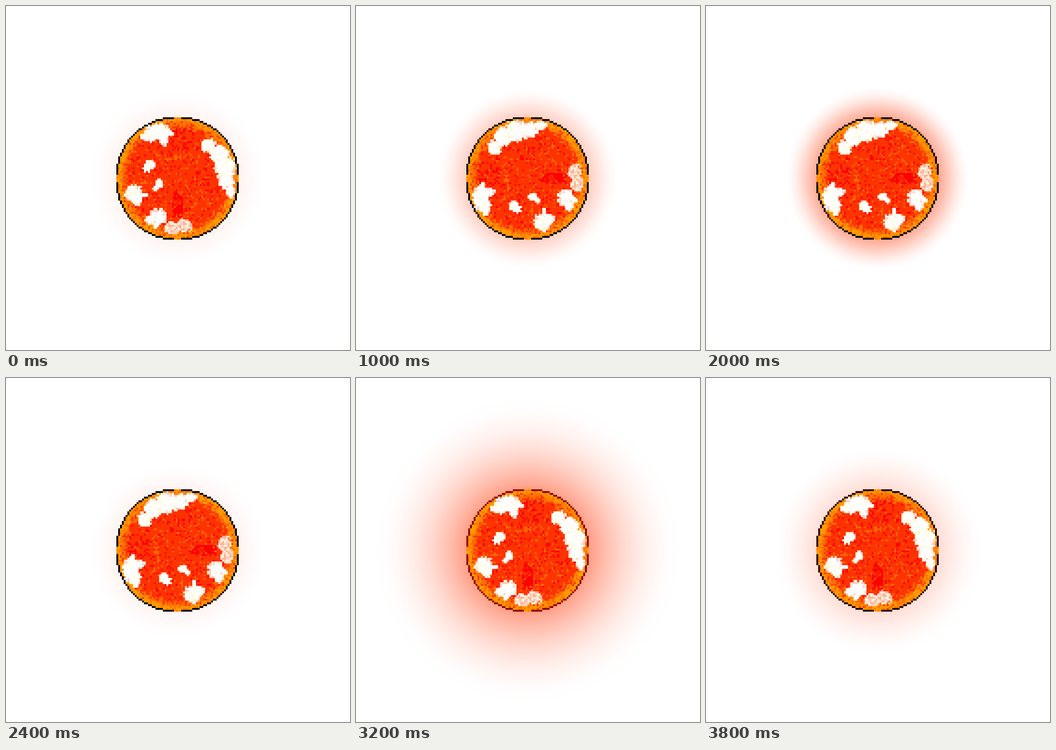
An HTML page with a canvas that plays this animation: 748 px wide and 748 px high, repeating every 4 s.

```html
<!DOCTYPE html>
<html lang="en">
<head>
<meta charset="utf-8">
<title>Glowing orb</title>
<style>
html, body { margin: 0; width: 100%; height: 100%; overflow: hidden; background: #fff; }
canvas { display: block; }
</style>
</head>
<body>
<canvas id="stage" width="748" height="748"></canvas>
<script>
const ctx = document.getElementById("stage").getContext("2d");
const N = 66, SIZE = 266, CX = 373, CY = 375, RADIUS = 132;
const HALF = SIZE / 2;

let seed = 41;
function random() {
  seed = (seed + 0x6D2B79F5) | 0;
  let t = Math.imul(seed ^ (seed >>> 15), 1 | seed);
  t = (t + Math.imul(t ^ (t >>> 7), 61 | t)) ^ t;
  return ((t ^ (t >>> 14)) >>> 0) / 4294967296;
}

// Bright patches: centre x, y, radius x, y in stage pixels
const patches = [
  [331, 273, 29, 17], [312, 284, 19, 11], [343, 291, 11, 12], [354, 278, 12, 6],
  [441, 303, 15, 15], [463, 322, 20, 19], [477, 350, 23, 23], [478, 378, 17, 19], [488, 402, 10, 15],
  [313, 346, 12, 11], [307, 354, 8, 7],
  [333, 386, 8, 9], [325, 396, 7, 6],
  [278, 407, 19, 18], [286, 421, 10, 13], [301, 411, 8, 5],
  [330, 458, 20, 17], [314, 465, 11, 9], [325, 474, 8, 7]
];
const veil = [[364, 483, 18, 14], [388, 476, 18, 15]];

const nearest = (list, x, y) =>
  Math.min(...list.map(([a, b, rx, ry]) => Math.hypot((x - a) / rx, (y - b) / ry)));

const within = (x, y, x0, y0, x1, y1) => x > x0 && x < x1 && y > y0 && y < y1;

function inside(i, j) {
  const x = i - 32.5, y = j - 32.5;
  return x * x + y * y < 1126;
}

const onEdge = (i, j) => inside(i, j) &&
  !(inside(i - 1, j) && inside(i + 1, j) && inside(i, j - 1) && inside(i, j + 1));

function surface(x, y, r) {
  const a = random(), b = random();
  const patch = nearest(patches, x, y) + (a - 0.5) * 0.3;
  if (patch < 0.8) return b < 0.85 ? "#fff" : "#fffbd8";
  if (patch < 1.05) return b < 0.4 ? "#fff" : b < 0.7 ? "#fff0cc" : "#ffccc4";
  if (nearest(veil, x, y) + (a - 0.5) * 0.3 < 1)
    return b < 0.35 ? "#fff4e0" : b < 0.7 ? "#ffd0c0" : "#ffb090";

  const rim = r + (a - 0.5) * 3.5;
  if (rim > 30.3) return b < 0.65 ? "#ff9900" : "#ff7a00";
  if (rim > 28) return b < 0.75 ? "#ff6c00" : "#ff3300";

  let red = 0.1, orange = 0.09;
  if (within(x, y, 359, 408, 387, 460)) red = 0.6;
  if (within(x, y, 358, 255, 412, 320)) red = 0.28;
  if (within(x, y, 404, 374, 442, 400)) red = 0.32;
  if (within(x, y, 315, 322, 410, 333)) orange = 0.35;
  if (within(x, y, 366, 323, 382, 333)) orange = 0.9;
  return b < red ? "#ff0000" : b > 1 - orange ? "#ff6600" : "#ff3300";
}

function grid(paint) {
  const c = document.createElement("canvas");
  c.width = c.height = N;
  const g = c.getContext("2d");
  for (let j = 0; j < N; j++)
    for (let i = 0; i < N; i++) {
      const color = paint(i, j);
      if (color) {
        g.fillStyle = color;
        g.fillRect(i, j, 1, 1);
      }
    }
  return c;
}

const scale = SIZE / N;
const orb = grid((i, j) => inside(i, j) && surface(
  CX + (i - 32.5) * scale, CY + (j - 32.5) * scale, Math.hypot(i - 32.5, j - 32.5)));

const outlines = {};
const outline = color =>
  outlines[color] ||= grid((i, j) => onEdge(i, j) && color);

// Glow: strength, reach, falloff power, red in the outline
const rest = [0.06, 66, 1.3, 0];
const flare = [0.8, 76, 1.5, 0];
const spread = [0.5, 206, 1, 145];
const glowKeys = [rest, rest, flare, rest, spread, rest];
const turnKeys = [0, 1, 1, 1, 0, 0];
const mix = (a, b, t) => a + (b - a) * t;

function drawGlow(strength, reach, power) {
  const end = RADIUS + reach;
  const g = ctx.createRadialGradient(CX, CY, RADIUS - 4, CX, CY, end);
  for (let k = 0; k <= 32; k++) {
    const u = k / 32;
    const alpha = strength * (1 - u ** power) ** 2;
    g.addColorStop(u, `rgba(255,51,0,${alpha.toFixed(4)})`);
  }
  ctx.fillStyle = g;
  ctx.beginPath();
  ctx.arc(CX, CY, end, 0, 7);
  ctx.fill();
}

function drawGrid(image, angle, alpha) {
  ctx.save();
  ctx.imageSmoothingEnabled = false;
  ctx.globalAlpha = alpha;
  ctx.translate(CX, CY);
  ctx.rotate(angle);
  ctx.drawImage(image, -HALF, -HALF, SIZE, SIZE);
  ctx.restore();
}

function draw(step) {
  const key = Math.floor(step / 4), t = step % 4 / 4;
  const [strength, reach, power, red] =
    glowKeys[key].map((v, n) => mix(v, glowKeys[key + 1][n], t));
  const turned = mix(turnKeys[key], turnKeys[key + 1], t);

  ctx.fillStyle = "#fff";
  ctx.fillRect(0, 0, 748, 748);
  drawGlow(strength, reach, power);
  drawGrid(orb, 0, 1);
  if (turned) drawGrid(orb, -Math.PI / 2, turned);
  drawGrid(outline(`rgb(${Math.round(red)},0,0)`), 0, 1);
}

const start = performance.now();
function frame() {
  draw(Math.floor((performance.now() - start) % 4000 / 200));
  requestAnimationFrame(frame);
}
frame();
</script>
</body>
</html>
```
